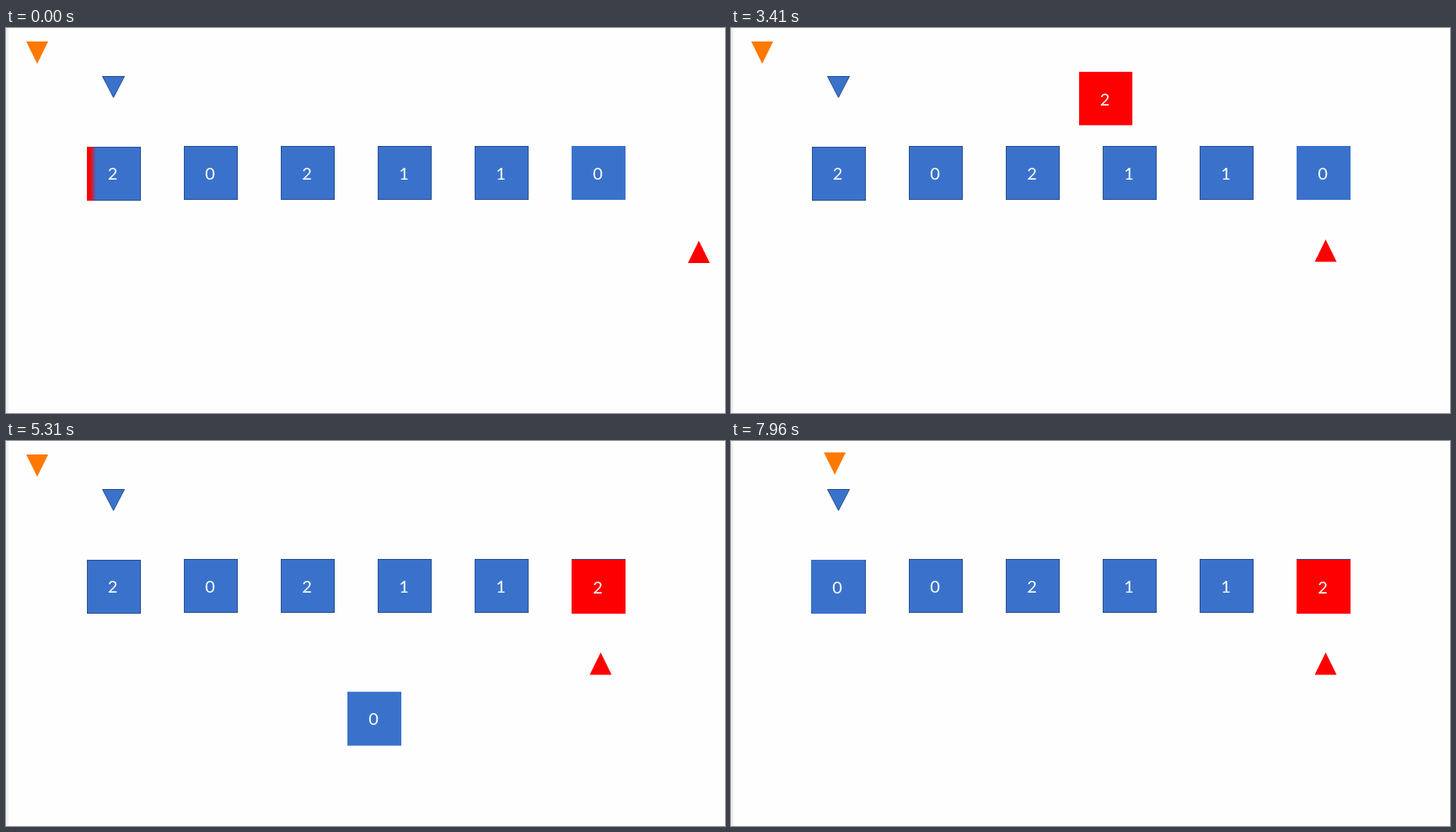
Animation, 853 px wide and 457 px high, one loop 8 s. Source, as an HTML page:

```html
<!DOCTYPE html>
<html lang="en">
<head>
<meta charset="utf-8">
<title>Swapping tiles</title>
<style>
  html, body { margin: 0; width: 100%; height: 100%; overflow: hidden; background: #fefefe; }
  svg { display: block; width: 853px; height: 457px; }
  text { font: 20px Lato, "Open Sans", sans-serif; fill: #fff; text-anchor: middle; }
  .tile { fill: #3a72cb; }
  .outlined { stroke: #2a5190; stroke-width: 1; }
  .red { fill: #f00; }
</style>
</head>
<body>
<svg id="stage" viewBox="0 0 853 457">
  <defs>
    <linearGradient id="softEdge" gradientUnits="userSpaceOnUse" x1="-7" x2="0" y1="0" y2="0">
      <stop offset="0" stop-color="#fff"/>
      <stop offset="1" stop-color="#000"/>
    </linearGradient>
    <mask id="wipe" maskUnits="userSpaceOnUse" x="0" y="0" width="64" height="64">
      <rect width="64" height="64" fill="url(#softEdge)"/>
    </mask>
  </defs>
  <rect width="3" height="457" fill="#f0f0f0"/>
  <g id="row"></g>
  <path id="orangeMark" d="M24 16H50L37 42.5Z" fill="#ff7800"/>
  <path class="tile outlined" d="M114.5 57.5H140.5L127.5 82.5Z"/>
  <path id="redMark" class="red" d="M822 252.5L835 279H809Z"/>
  <g id="redTile">
    <g mask="url(#wipe)">
      <rect class="red" width="64" height="64"/>
      <text x="31" y="39.7">2</text>
    </g>
  </g>
  <g id="blueTile">
    <rect class="tile" width="64" height="64"/>
    <text x="31" y="39.7">0</text>
  </g>
</svg>
<script>
const LOOP = 8000;
const SVG_NS = "http://www.w3.org/2000/svg";
const byId = id => document.getElementById(id);

byId("row").innerHTML = [2, 0, 2, 1, 1, 0].map((digit, i) => {
  const x = 96 + 115 * i, y = i ? 140 : 141;
  return `<g transform="translate(${x} ${y})">
    <rect class="tile outlined" x=".5" y=".5" width="63" height="63"/>
    <text x="${i ? 31 : 30.5}" y="${i ? 40 : 39.2}">${digit}</text></g>`;
}).join("");

const makePath = d => {
  const path = document.createElementNS(SVG_NS, "path");
  path.setAttribute("d", d);
  return path;
};

// Straight flanks joined by a rounded crown of the given height.
function arc(x0, y0, x1, y1, height) {
  const at = (u, v) => `${x0 + (x1 - x0) * u} ${y0 + (y1 - y0) * u + height * v}`;
  return makePath(`M${at(0, 0)}L${at(.268, .741)}C${at(.324, .91)} ${at(.408, 1)} ${at(.5, 1)}` +
    `C${at(.592, 1)} ${at(.676, .91)} ${at(.732, .741)}L${at(1, 0)}`);
}
const line = (dx, dy) => makePath(`M0 0L${dx} ${dy}`);

const ease = p => p < .5 ? 4 * p ** 3 : 1 - 4 * (1 - p) ** 3;
const clamp = p => Math.min(1, Math.max(0, p));

const moves = [
  { id: "redMark", start: 390, span: 2180, path: line(-116.5, -1.5) },
  { id: "redTile", start: 2378, span: 2000, path: arc(96, 141, 671, 141, -90) },
  { id: "blueTile", start: 4250, span: 2170, path: arc(671, 140, 95, 141, 158) },
  { id: "orangeMark", start: 6310, span: 2000, path: line(88, -2.5) }
].map(m => ({ ...m, node: byId(m.id), length: m.path.getTotalLength() }));

function draw(t) {
  for (const { node, start, span, path, length } of moves) {
    const { x, y } = path.getPointAtLength(length * ease(clamp((t - start) / span)));
    node.setAttribute("transform", `translate(${x} ${y})`);
  }
  const edge = 71 * clamp((t + 75) / 500);
  byId("softEdge").setAttribute("gradientTransform", `translate(${edge} 0)`);
}

const begin = performance.now();
function tick() {
  draw((performance.now() - begin) % LOOP);
  requestAnimationFrame(tick);
}
tick();
</script>
</body>
</html>
```
